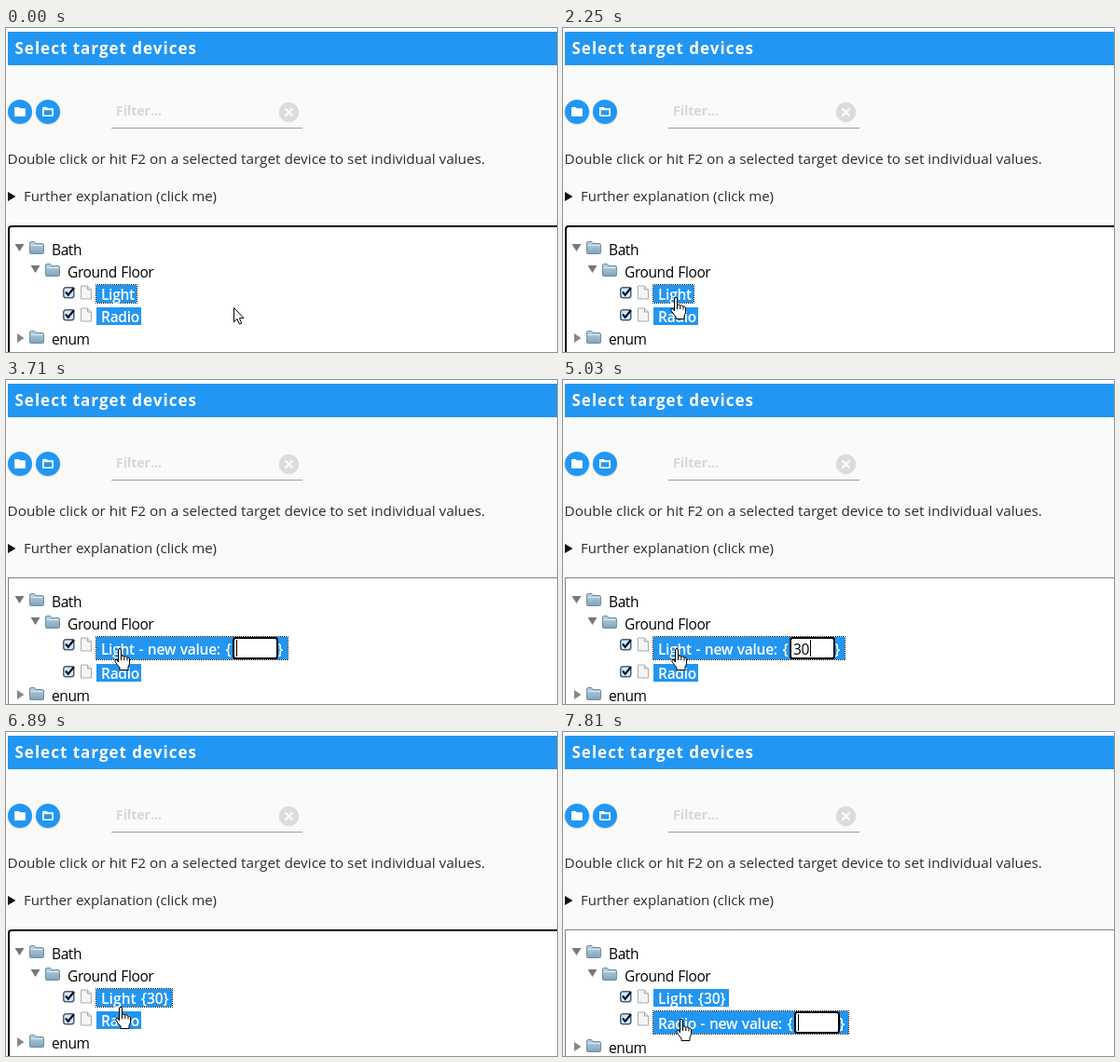
Write an HTML page that moves like this. It is 591x348 px and loops after 8000 ms.

```html
<!DOCTYPE html>
<html lang="en">
<head>
<meta charset="utf-8">
<title>Select target devices</title>
<style>
  html, body { margin: 0; width: 100%; height: 100%; overflow: hidden; background: #fafafa; }
  svg { display: block; font: 15.3px "Open Sans", "Noto Sans", sans-serif; fill: #2c2c2c; }
  text { white-space: pre; }
  #tree { font-size: 15.5px; word-spacing: .9px; fill: #000; }
  .node { letter-spacing: -.4px; }
  .picked { fill: #fff; font-weight: 600; letter-spacing: -.28px; }
  .valued { letter-spacing: .1px; }
  .dotted { fill: none; stroke: #000; stroke-dasharray: 1 1; stroke-dashoffset: .5; }
</style>
</head>
<body>
<svg width="591" height="348" viewBox="0 0 591 348">
  <defs>
    <linearGradient id="steel" x2="0" y2="1">
      <stop stop-color="#b9d3e2"/><stop offset="1" stop-color="#7fa3b9"/>
    </linearGradient>
    <g id="folder">
      <path d="M.5 12.5V2Q.5.5 2 .5H5.5L7 2.5H14Q15.5 2.5 15.5 4V12.5Q15.5 13.5 14.5 13.5H1.5Q.5 13.5.5 12.5Z" fill="url(#steel)" stroke="#6d8ea3"/>
      <path d="M1.5 4.5H14.5" stroke="#dcebf3"/>
    </g>
    <g id="page" stroke="#aaa">
      <path d="M.5.5H7.5L11.5 4.5V14.5H.5Z" fill="#f4f4f4"/>
      <path d="M7.5.5V4.5H11.5" fill="#ddd"/>
    </g>
    <g id="check">
      <rect x=".75" y="1.75" width="11" height="11" rx="2.5" fill="#d8e8f5" stroke="#41617f" stroke-width="1.5"/>
      <path d="M3 6.5L5.7 9.7L12 2" fill="none" stroke="#0b1626" stroke-width="2.2"/>
    </g>
    <path id="open" d="M0 0H10L5 8Z" fill="#777"/>
    <path id="arrow" d="M.5.5V15.8L4 12.5L6.3 18L8.7 17L6.4 11.7H11Z" fill="#fff" stroke="#000"/>
    <g id="hand" stroke="#000" stroke-linejoin="round">
      <path d="M-1.5 15V2Q-1.5.5 0 .5T1.5 2V9Q1.5 8 3 8T4.8 9.5Q5 8.7 6.3 8.9T8 10.5Q8.2 9.8 9.2 10T10.5 12V16Q10.5 18 9 20V23.5H0V21Q-3 18-5 14.5Q-5.5 12.5-4 12.3T-1.5 15Z" fill="#fff"/>
      <path d="M1.5 9V13M4.8 9.5V13M8 10.5V13.5" fill="none"/>
    </g>
  </defs>

  <rect width="591" height="348" fill="#fafafa"/>
  <rect width="591" height="4" fill="#fff"/>
  <rect x="2" y="4" width="589" height="36" fill="#2196f3"/>
  <text x="9.5" y="28" fill="#fff" font-size="17" font-weight="700" letter-spacing="1">Select target devices</text>

  <g fill="#000" opacity=".09"><circle cx="15" cy="91" r="13.5"/><circle cx="45" cy="91" r="13.5"/></g>
  <g fill="#2196f3"><circle cx="15" cy="90" r="13"/><circle cx="45" cy="90" r="13"/></g>
  <path d="M9 94V86Q9 85 10 85H13.5L15 86.2H20Q21 86.2 21 87.2V94Q21 95 20 95H10Q9 95 9 94Z" fill="#fff"/>
  <path d="M39.8 93.4V85.8H43.5L45 87H50.2V93.4Q50.2 94.2 49.4 94.2H40.6Q39.8 94.2 39.8 93.4ZM40 87.4H50" fill="none" stroke="#fff" stroke-width="1.6"/>

  <text x="118" y="94" fill="#d6d6d6" font-size="14" font-weight="700">Filter...</text>
  <path d="M113 107.5H318" stroke="#9e9e9e"/>
  <circle cx="303.5" cy="90.5" r="10.7" fill="#dcdcdc"/>
  <path d="M299.5 86.5L307.5 94.5M307.5 86.5L299.5 94.5" stroke="#fff" stroke-width="2"/>

  <text x="1.5" y="146">Double click or hit F2 on a selected target device to set individual values.</text>
  <path d="M2 176V186L10.5 181Z" fill="#111"/>
  <text x="19" y="186" font-size="15">Further explanation (click me)</text>

  <g id="tree"></g>
  <circle id="click" r="12" fill="#ff0" opacity=".5"/>
  <use id="cursor"/>
</svg>
<script>
const $ = id => document.getElementById(id);
const LOOP = 8000;
const use = (id, x, y) => `<use href="#${id}" x="${x}" y="${y}"/>`;
const label = (x, y, text, cls = "node") => `<text x="${x}" y="${y}" class="${cls}">${text}</text>`;
const within = (t, ...spans) => spans.some(([from, to]) => t >= from && t < to);

// The dotted focus outline lies just outside the blue box
function highlight(y, width, height, focused) {
  const box = `<rect x="97" y="${y}" width="${width}" height="${height}" fill="#2196f3"/>`;
  return box + (focused
    ? `<rect x="96.5" y="${y - .5}" width="${width + 1}" height="${height + 1}" class="dotted"/>`
    : "");
}

function editor(x, y, typed, caret) {
  const caretX = x + 4 + Math.round(typed.length * 8.8);
  return label(x - 7.5, y + 19, "{", "picked") + label(x + 48.5, y + 19, "}", "picked")
    + `<rect x="${x + 1}" y="${y + 1}" width="47" height="22" rx="2.5" fill="#fff" stroke="#000" stroke-width="2"/>`
    + label(x + 4, y + 19, typed)
    + (caret ? `<rect x="${caretX}" y="${y + 3}" width="1" height="18"/>` : "");
}

// y is the top of the highlighted name; shift moves the row down below an open editor
function device(y, shift, d) {
  const top = y + shift;
  const icons = use("check", 61, top + 1) + use("page", 80, top + .5);
  if (d.editing) {
    return icons + highlight(top, d.editWidth, 24, true)
      + label(102, top + 19, d.name + " - new value:", "picked")
      + editor(d.inputX, top, d.typed, d.caret);
  }
  return icons + highlight(top, d.width, 19, d.focused)
    + label(102, top + 16, d.name + d.value, d.value ? "picked valued" : "picked");
}

function tree(t) {
  const editLight = within(t, [2700, 5440]), editRadio = t >= 7810;
  const editing = editLight || editRadio;
  const saved = t >= 5440, radioFocus = t >= 7580;
  const light = {
    name: "Light", value: saved ? " {30}" : "", width: saved ? 81 : 43, focused: !radioFocus,
    editing: editLight, editWidth: 205, inputX: 243,
    typed: t >= 5030 ? "30" : t >= 4880 ? "3" : "",
    caret: !within(t, [3250, 3710], [4260, 4790])
  };
  const radio = {
    name: "Radio", value: "", width: 48, focused: radioFocus,
    editing: editRadio, editWidth: 209, inputX: 248, typed: "", caret: true
  };
  const frame = editing
    ? `<path d="M2 212H591V348H2Z" fill="#fff"/><path d="M2.5 348V212.5H591" class="dotted"/>`
    : `<rect x="3" y="213" width="600" height="150" rx="3" fill="#fff" stroke="#000" stroke-width="2"/>`;
  const drop = editing ? 5 : 0;
  return frame
    + use("open", 9.5, 232) + use("folder", 25, 229) + label(49, 244, "Bath")
    + use("open", 26.5, 255) + use("folder", 42, 253) + label(66, 268, "Ground Floor")
    + device(276, 0, light) + device(300, editLight ? 5 : 0, radio)
    + `<path d="M12 ${328 + drop}V${338 + drop}L19.5 ${333 + drop}Z" fill="#888"/>`
    + use("folder", 25, 325 + drop) + label(49, 340 + drop, "enum");
}

const mix = (a, b, p) => a.map((v, i) => Math.round(v + (b[i] - v) * p));

// The pointer is sampled in discrete steps of about 77 and 85 ms
function pointer(t) {
  if (t < 1080) return [244, 300];
  if (t < 1770) {
    const step = Math.floor((t - 1080) / 76.67) + 1;
    return step <= 8 ? mix([244, 300], [153, 290], step / 8) : [137, 290];
  }
  if (t < 3100) return [121, 289];
  if (t < 6890) return [122, 288];
  if (t < 7210) return mix([122, 288], [126, 308], Math.min(3, Math.floor((t - 6890) / 85) + 1) / 3);
  return [127, 308];
}

let shown = "";
function render(t) {
  const markup = tree(t);
  if (markup !== shown) $("tree").innerHTML = shown = markup;
  const [x, y] = pointer(t);
  const cursor = $("cursor"), click = $("click");
  cursor.setAttribute("href", x < 140 ? "#hand" : "#arrow");
  cursor.setAttribute("x", x);
  cursor.setAttribute("y", y);
  click.setAttribute("cx", x);
  click.setAttribute("cy", y);
  const pressed = within(t, [2090, 2250], [2550, 2700], [7440, 7580], [7660, 7810]);
  click.setAttribute("visibility", pressed ? "visible" : "hidden");
}

const start = performance.now();
function tick() {
  render((performance.now() - start) % LOOP);
  requestAnimationFrame(tick);
}
tick();
</script>
</body>
</html>
```
